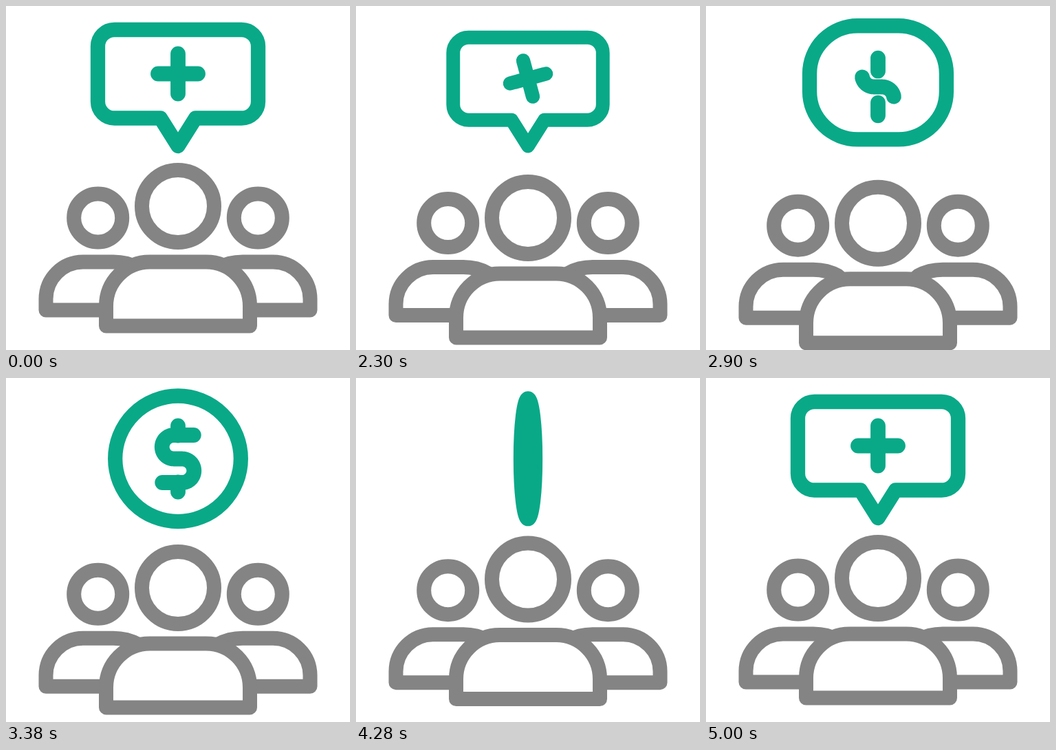
Write an HTML page with a canvas that moves like this. It is 500 px wide and 500 px high and loops after 5030 ms.

```html
<!DOCTYPE html>
<html lang="en">
<head>
<meta charset="utf-8">
<title>Group and health costs</title>
<style>
html, body { margin: 0; width: 100%; height: 100%; overflow: hidden; background: #fff; }
canvas { display: block; width: 500px; height: 500px; }
</style>
</head>
<body>
<canvas id="stage" width="500" height="500"></canvas>
<script>
const ctx = document.getElementById('stage').getContext('2d');
const GREEN = '#09a988', GREY = '#848484';
const LOOP = 5030, REST = 2030, STEP = 30, FLIP = 4320;

const mix = (a, b, k) => a + (b - a) * k;
const clamp = k => Math.min(1, Math.max(0, k));
const span = (t, a, b) => clamp((t - a) / (b - a));
const smooth = (t, a, b) => { const k = span(t, a, b); return k * k * (3 - 2 * k); };

// Value at t of [time, value] keys with smooth easing between them
function keys(t, list) {
  let value = list[0][1];
  for (let i = 1; i < list.length; i++)
    value += (list[i][1] - list[i - 1][1]) * smooth(t, list[i - 1][0], list[i][0]);
  return value;
}

// cubic-bezier(.3, 0, .13, 1)
function ease(x) {
  let lo = 0, hi = 1;
  for (let i = 0; i < 24; i++) {
    const s = (lo + hi) / 2, r = 1 - s;
    if (3 * r * r * s * .3 + 3 * r * s * s * .13 + s ** 3 < x) lo = s; else hi = s;
  }
  return lo * lo * (3 - 2 * lo);
}

function stroke(path, color, width = 21, fill) {
  if (fill) { ctx.fillStyle = fill; ctx.fill(path); }
  ctx.strokeStyle = color;
  ctx.lineWidth = width;
  ctx.stroke(path);
}

const side = new Path2D('M145 442H58V426A54 54 0 0 1 112 372H156q20 0 36 9');
side.moveTo(168.7, 308);
side.arc(133.7, 308, 35, 0, 7);
const torso = new Path2D('M145.5 465V436A63.5 64 0 0 1 209 372H291A63.5 64 0 0 1 354.5 436V465Z');
const head = new Path2D();
head.arc(250, 291, 52.5, 0, 7);

function people(drop) {
  for (const flip of [1, -1]) {
    ctx.save();
    ctx.translate(250, drop * .45);
    ctx.scale(flip, 1);
    ctx.translate(-250, 0);
    stroke(side, GREY);
    ctx.restore();
  }
  ctx.save();
  ctx.translate(0, drop);
  stroke(torso, GREY, 21, '#fff');
  stroke(head, GREY);
  ctx.restore();
}

// Speech bubble at m = 0, coin at m = 1; x is measured from the middle
function frame(m, radius, wide) {
  const p = new Path2D();
  const hw = mix(116.5, radius, m);
  const top = mix(34.5, 117.3 - radius, m), bottom = mix(163, 117.3 + radius, m);
  const r = Math.min(mix(24, radius, m), hw, (bottom - top) / 2);
  const tail = 40.5 * (1 - 2 * m);
  const x = hw - r, q = Math.PI / 2;
  const corner = (cx, cy, a) => p.ellipse(cx * wide, cy, r * wide, r, 0, a, a + q);
  corner(-x, top + r, -2 * q);
  corner(x, top + r, -q);
  corner(x, bottom - r, 0);
  if (tail > 0) {
    p.lineTo(25.5 * wide, bottom);
    p.lineTo(0, bottom + tail);
    p.lineTo(-25.5 * wide, bottom);
  }
  corner(-x, bottom - r, q);
  p.closePath();
  return p;
}

// Plus at m = bend = 0; its bar curls and grows into an S
function symbol(m, bend, half, wide, angle) {
  const p = new Path2D();
  for (const sign of [-1, 1]) {
    p.moveTo(0, sign * 34 * m);
    p.lineTo(0, sign * mix(29, 48, m));
    p.moveTo(0, 0);
    let x = 0, y = 0;
    for (let s = 0; s < half; s++) {
      const turn = bend * Math.min(54.2, Math.max(0, s + .5 - 6)) / 17.25;
      x += Math.cos(turn);
      y += Math.sin(turn);
      p.lineTo(sign * x * wide, sign * y);
    }
  }
  const turned = new Path2D();
  turned.addPath(p, new DOMMatrix().rotate(angle));
  return turned;
}

function draw(t) {
  ctx.clearRect(0, 0, 500, 500);
  ctx.lineJoin = ctx.lineCap = 'round';
  if (t < REST || t >= 5000) t = 0;
  else t = REST + Math.floor((t - REST) / STEP) * STEP;

  people(25 * (ease(span(t, 2000, 2800)) - ease(span(t, 2800, 5000))));

  const coin = t < FLIP;
  const m = coin ? smooth(t, 2540, 3120) : 0;
  const bend = coin ? smooth(t, 2560, 2860) : 0;
  const half = coin ? mix(29, 89, smooth(t, 2880, 3250)) : 29;
  const radius = mix(91.3, 87.3, smooth(t, 3650, 4350));
  const wide = coin ? Math.cos(span(t, 3800, FLIP) * Math.PI / 2)
                    : Math.sin(span(t, FLIP, 4760) * Math.PI / 2);
  const scale = keys(t, [[1980, 1], [2180, .89], [2555, 1.07], [2800, 1]]);
  const angle = keys(t, [[1980, 0], [2140, 10], [2300, -15], [2450, 12], [2580, 0]]);

  ctx.save();
  ctx.translate(250, 203.5);
  ctx.scale(scale, scale);
  ctx.translate(0, -203.5);
  stroke(frame(m, radius, wide), GREEN, 21.3);
  ctx.translate(0, mix(98.5, 117.5, bend));
  stroke(symbol(m, bend, half, wide, angle), GREEN, 21.8);
  ctx.restore();
}

const start = performance.now();
function tick() {
  draw((performance.now() - start) % LOOP);
  requestAnimationFrame(tick);
}
tick();
</script>
</body>
</html>
```
